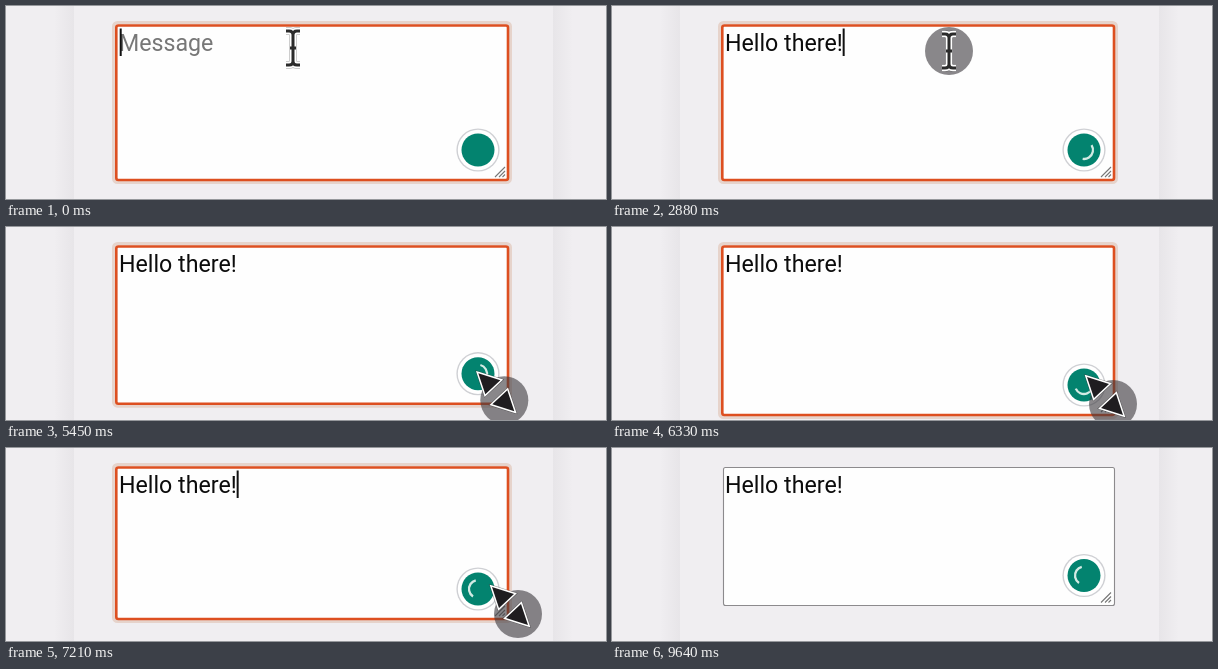
These frames come from a looping animation (600 by 193 pixels, 9.67 s). An HTML page with a canvas:

```html
<!DOCTYPE html>
<html lang="en">
<head>
<meta charset="utf-8">
<title>Message box</title>
<style>
html, body { margin: 0; width: 100%; height: 100%; overflow: hidden; background: #f0eef1; }
canvas { display: block; }
</style>
</head>
<body>
<canvas id="stage" width="600" height="193"></canvas>
<script>
const ctx = document.getElementById('stage').getContext('2d');
const LOOP = 9670;
const MESSAGE = 'Hello there!';
const KEY_TIMES = [300, 450, 610, 760, 910, 1060, 1240, 1370, 1490, 1620, 1740, 1870];
const BLUR_TIME = 8700;
const BLINK = 375;

// Rows of [time, value, ...]
const POINTER = [
  [2150, 287, 42], [2880, 337, 45], [3500, 380, 52], [4390, 397, 65], [5100, 498, 172],
  [5300, 498, 172], [5900, 500, 180], [6330, 501, 177], [7210, 512, 166],
  [7950, 519, 152], [8150, 519, 152], [8650, 553, 140]
];
const BOTTOM = [[5300, 174], [5900, 191], [6330, 188], [7210, 171], [7950, 157.5]];

const clamp = x => Math.max(0, Math.min(1, x));

function track(rows, t) {
  let i = 0;
  while (i < rows.length - 2 && t > rows[i + 1][0]) i++;
  const [a, b] = [rows[i], rows[i + 1]];
  const p = clamp((t - a[0]) / (b[0] - a[0]));
  const eased = p * p * (3 - 2 * p);
  return a.slice(1).map((v, k) => v + (b[k + 1] - v) * eased);
}

function disc(x, y, r, fill) {
  ctx.beginPath();
  ctx.arc(x, y, r, 0, 7);
  ctx.fillStyle = fill;
  ctx.fill();
}

function box(x, y, w, h, r, color, width) {
  ctx.beginPath();
  ctx.roundRect(x, y, w, h, r);
  ctx.strokeStyle = color;
  ctx.lineWidth = width;
  ctx.stroke();
}

function sideShadow(from, to) {
  const g = ctx.createLinearGradient(from, 0, to, 0);
  g.addColorStop(0, 'rgba(90,85,95,.06)');
  g.addColorStop(1, 'rgba(90,85,95,0)');
  ctx.fillStyle = g;
  ctx.fillRect(Math.min(from, to), 0, Math.abs(to - from), 193);
}

function background() {
  ctx.fillStyle = '#f0eef1';
  ctx.fillRect(0, 0, 600, 193);
  sideShadow(68, 48);
  sideShadow(547, 567);
}

function textArea(bottom, focused) {
  ctx.fillStyle = '#fefefe';
  ctx.fillRect(111, 20, 391, bottom - 20);
  if (focused) {
    box(107.5, 16.5, 397, bottom - 14, 4, '#e6d3cb', 3);
    box(110.3, 19.5, 391.7, bottom - 19.5, 2, '#dd4f20', 2.6);
  } else {
    box(111.5, 19.5, 391, bottom - 19.5, 2, '#8c8a8d', 1.1);
  }
  ctx.beginPath();
  for (const d of [10, 6, 2.5]) {
    ctx.moveTo(499 - d, bottom - 3);
    ctx.lineTo(499, bottom - 3 - d);
  }
  ctx.strokeStyle = '#777';
  ctx.lineWidth = 1.1;
  ctx.stroke();
}

function typedText(t, focused) {
  const typed = MESSAGE.slice(0, KEY_TIMES.filter(k => t >= k).length);
  ctx.font = '23.2px Roboto, sans-serif';
  ctx.fillStyle = typed ? '#0c0c0c' : '#777';
  ctx.fillText(typed || 'Message', 113, 44.5);
  const idle = t - KEY_TIMES[KEY_TIMES.length - 1];
  if (focused && (idle < 0 || Math.floor(idle / BLINK) % 2 === 0)) {
    ctx.fillStyle = '#111';
    ctx.fillRect(113 + (typed ? ctx.measureText(typed).width : 0.7), 22.5, 2, 27.5);
  }
}

function badge(t, y) {
  disc(472, y, 21.6, '#cfd0d4');
  disc(472, y, 20.2, '#fff');
  disc(472, y, 16.5, '#03836f');
  if (t < KEY_TIMES[6]) return;
  const mid = (190 - (t - 9640) * 360 / 1215) * Math.PI / 180;
  ctx.beginPath();
  ctx.arc(472, y, 9, mid - 1.15, mid + 1.15);
  ctx.strokeStyle = '#d3ebe4';
  ctx.lineWidth = 2.3;
  ctx.stroke();
}

function outlined(path, layers) {
  for (const [color, width] of layers) {
    ctx.strokeStyle = color;
    ctx.lineWidth = width;
    ctx.stroke(path);
  }
}

const beam = new Path2D(
  'M-7-17h3q4 0 4 4v26q0 4-4 4h-3M7-17h-3q-4 0-4 4M7 17h-3q-4 0-4-4M-3 0h6');
const arrows = new Path2D('M-18-19L4-12L-11 2ZM18 19L-4 12L11-2Z');

function pointer(t) {
  if (t > 8960) return;
  const [x, y] = track(POINTER, t);
  ctx.save();
  ctx.globalAlpha = clamp((8960 - t) / 150);
  if (t > 1960) disc(x, y, 24, `rgba(60,58,62,${0.6 * clamp((t - 1960) / 100)})`);
  ctx.translate(x, y);
  if (t < 4200) {
    outlined(beam, [['rgba(60,60,60,.45)', 7.5], ['#fff', 6.5], ['#2b2b2b', 3]]);
  } else if (t < 4850) {
    disc(0, 0, 5, '#fff');
  } else {
    ctx.translate(-8, -8);
    ctx.lineJoin = 'miter';
    outlined(arrows, [['rgba(40,40,40,.5)', 4], ['#fff', 3]]);
    ctx.fillStyle = '#1f1d20';
    ctx.fill(arrows);
  }
  ctx.restore();
}

function draw(now) {
  const t = now % LOOP;
  const focused = t < BLUR_TIME;
  const [bottom] = track(BOTTOM, t);
  background();
  textArea(bottom, focused);
  typedText(t, focused);
  badge(t, bottom - 30);
  pointer(t);
}

const start = performance.now();
function tick() {
  draw(performance.now() - start);
  requestAnimationFrame(tick);
}
tick();
</script>
</body>
</html>
```
